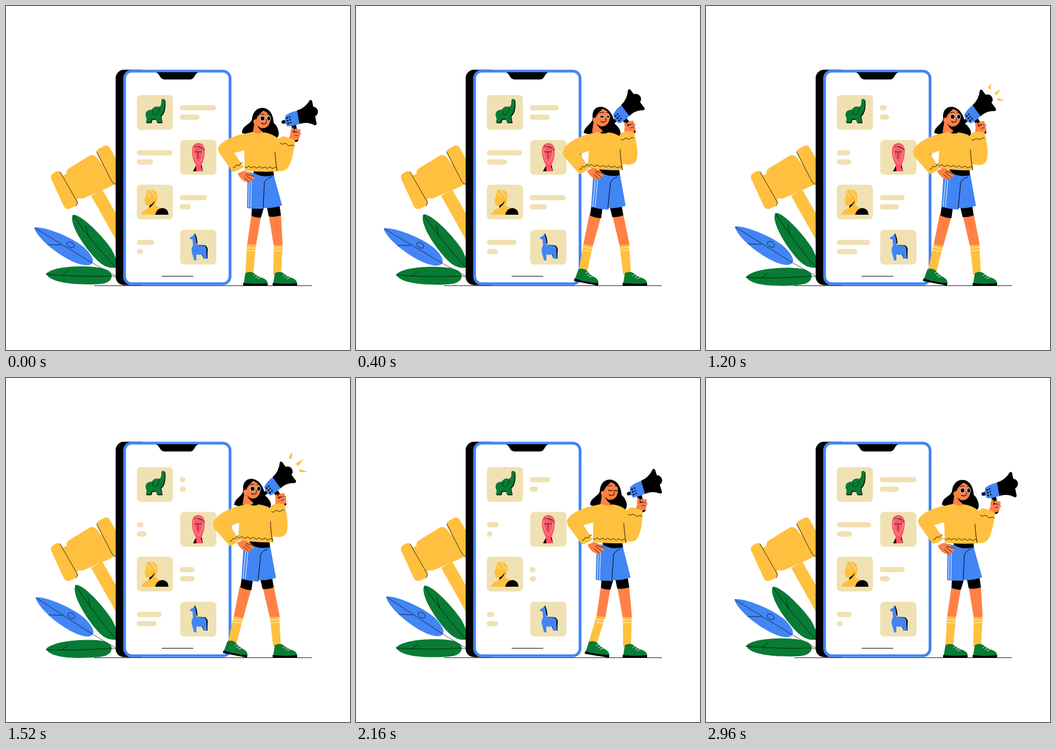
Animation of 618 by 618 pixels, one loop 3040 ms. Source, as an HTML page:

```html
<!DOCTYPE html>
<html lang="en">
<head>
<meta charset="utf-8">
<title>Online auction</title>
<style>
html, body { margin: 0; width: 100%; height: 100%; overflow: hidden; background: #fff; }
svg { display: block; width: 618px; height: 618px; }
</style>
</head>
<body>
<svg id="stage" viewBox="0 0 618 618"></svg>
<script>
const LOOP = 3040, STEP = 80;
const YELLOW = '#ffc03f', BLUE = '#4285f4', GREEN = '#087b34', SKIN = '#ff8145',
      SAND = '#f0e1b3', RED = '#ff5868', BLACK = '#000', WHITE = '#fff';

const fill = (d, color) => `<path d="${d}" fill="${color}"/>`;
const line = (d, w = 1, color = BLACK) =>
  `<path d="${d}" fill="none" stroke="${color}" stroke-width="${w}" stroke-linecap="round" stroke-linejoin="round"/>`;
const group = (tf, ...parts) => `<g transform="${tf}">${parts.join('')}</g>`;
const box = (x, y, w, h, r, color, more = '') =>
  `<rect x="${x}" y="${y}" width="${w}" height="${h}" rx="${r}" fill="${color}" ${more}/>`;
const dot = (x, y, rx, ry, color) => `<ellipse cx="${x}" cy="${y}" rx="${rx}" ry="${ry}" fill="${color}"/>`;

const lerp = (a, b, p) => a + (b - a) * p;
const cycle = (t, peak) => Math.cos((t - peak) / LOOP * 2 * Math.PI);

// Blends two paths of equal structure
function mix(a, b, p) {
  const to = b.match(/[\d.]+/g);
  let i = 0;
  return a.replace(/[\d.]+/g, n => lerp(+n, +to[i++], p).toFixed(2));
}

// Reads a value from a table of [time, value] steps
function track(table, t) {
  const i = table.findIndex(k => k[0] >= t);
  if (i < 0) return table[table.length - 1][1];
  if (i === 0) return table[0][1];
  const [t0, v0] = table[i - 1], [t1, v1] = table[i];
  return lerp(v0, v1, (t - t0) / (t1 - t0));
}

function wave(x1, y1, x2, y2, bumps, amp) {
  const pts = [], n = bumps * 8, len = Math.hypot(x2 - x1, y2 - y1);
  for (let i = 0; i <= n; i++) {
    const s = Math.sin(i / n * bumps * 2 * Math.PI) * amp;
    pts.push([lerp(x1, x2, i / n) - (y2 - y1) / len * s, lerp(y1, y2, i / n) + (x2 - x1) / len * s]
      .map(v => v.toFixed(1)).join(' '));
  }
  return line('M' + pts.join('L'), .9);
}

function gavel() {
  return fill('M153 341 L173 330 L212 398 V446Z', YELLOW)
    + fill('M100 306 L164 272 L190 318 L124 349Z', YELLOW)
    + fill('M114 291 Q107 295 109 302 L128 341 Q132 348 140 345 L184 326 L200 318 L161 270 Q156 266 150 269Z', YELLOW)
    + fill('M87 299 Q94 294 99 299 L129 351 Q130 357 124 360 L112 365 Q106 365 103 358 L81 310 Q79 303 87 299Z', YELLOW)
    + fill('M166 257 L177 251 Q183 249 186 254 L215 305 L198 321 Q191 320 188 314 L164 267 Q161 260 166 257Z', YELLOW)
    + line('M97 298 L128 352 Q129 356 126 359', .8) + line('M163 262 L190 315 Q193 320 198 321', .8);
}

function leaves(t) {
  const up = 1.3 * (1 - cycle(t, -80)), low = -1.35 * (1 - cycle(t, -80)), mid = -1.4 * (cycle(t, 480) - .55);
  return group(`rotate(${up} 198 485)`,
      fill('M120 375 C135 373 175 415 189 436 Q197 450 199 460 L198 470 Q180 473 164 457 C140 433 112 390 120 375Z', GREEN),
      line('M121 377 Q150 419 199 472 M148 414 L143 395', .7))
    + group(`rotate(${mid} 198 487)`,
      fill('M51 398 C70 395 125 418 143 436 Q158 452 156 460 Q152 468 138 465 C110 460 58 422 51 399Z', BLUE),
      line('M52 399 Q100 428 154 461 L199 486 M75 429 L99 429', .7),
      '<ellipse cx="116" cy="429" rx="7" ry="4.5" transform="rotate(30 116 429)" fill="none" stroke="#000" stroke-width=".7"/>')
    + group(`rotate(${low} 198 487)`,
      fill('M72 481 C85 468 130 466 160 469 Q190 472 190 485 Q189 500 160 500 C125 501 80 498 72 481Z', GREEN),
      line('M72 482 Q130 487 190 485 L199 487 M101 484 L111 476', .7));
}

function elephant() {
  const d = 'M279 169 Q281 165 285 168 Q287 190 278 197 L280 209 H271 L269 203 H262 L260 209 H251 Q254 203 251 198 Q249 187 262 186 Q267 179 274 181 Q280 181 279 169Z';
  return group('translate(1.2 1.5)', fill(d, BLACK)) + fill(d, GREEN)
    + line('M264 188 Q262 197 270 195 Q275 191 275 184', .6);
}

function mask() {
  return fill('M342 285 L336 297 H354 L351 284Z', BLACK)
    + fill('M334 262 Q334 246 346 246 Q358 247 357 263 Q357 275 350 288 L354 297 H342 L341 286 Q334 274 334 262Z', RED)
    + line('M339 253 Q349 250 356 259', 1.2)
    + line('M337 262 Q337 252 346 251 Q355 252 354 262 Q353 275 346 283 Q338 276 337 262Z', .6, '#ffe4e0')
    + line('M338 262 H352 M345 263 V274', .8);
}

function bust() {
  let curls = '';
  for (let i = 0; i < 15; i++)
    curls += dot(252 + (i * 5) % 19, 332 + (i * 7) % 13, 1.1, .9, SAND);
  return fill('M252 341 Q249 329 261 330 Q272 331 272 343 Q272 352 268 356 Q270 362 284 364 L275 375 H243 Q244 367 257 363 Q259 361 258 358 Q251 360 250 356 L249 347Z', YELLOW)
    + fill('M268 375 Q271 363 282 363 Q291 364 292 375Z', BLACK)
    + fill('M258 358 Q264 356 267 349 Q267 356 257 363Z', BLACK)
    + curls;
}

function llama() {
  return fill('M339 408 Q344 415 344 429 L358 430 Q364 434 362 442 L362 454 H355 L345 430 L338 420Z', BLACK)
    + fill('M336 413 L338 409 L340 413 Q342 420 342 429 L357 431 Q361 434 360 441 L361 454 H355 L353 446 Q347 448 342 446 L342 457 H338 L334 443 Q332 436 336 430 L335 419 L331 419 Q329 415 336 413Z', BLUE);
}

function phone() {
  return box(197, 114.5, 60, 387, 15, BLACK)
    + box(213, 117, 189.5, 382, 13, WHITE, `stroke="${BLUE}" stroke-width="5"`)
    + fill('M269 119 C277 121 275 132 286 132 H330 C340 132 338 121 346 119Z', BLACK)
    + line('M280 485.5 H336', 1)
    + box(235, 160, 65, 62.5, 7, SAND) + box(313, 240.5, 65, 62.5, 7, SAND)
    + box(235, 321, 65, 62.5, 7, SAND) + box(313, 402, 65, 62.5, 7, SAND)
    + elephant() + mask() + bust() + llama();
}

// left, top, peak time; long and short bars alternate
const BARS = [[312, 178, -100], [312, 195, 200], [235, 259, 190], [235, 275.5, 540],
              [312, 339.5, 560], [312, 356, 880], [235, 420, 880], [235, 436.5, 1290]];
const bars = t => BARS.map(([x, y, peak], i) => {
  const [base, amp] = i % 2 ? [23.5, 13.5] : [38, 28];
  return box(x, y, (base + amp * cycle(t, peak)).toFixed(2), 9.5, 4.75, SAND);
}).join('');

const UPPER = [[80, 0], [160, .15], [240, .62], [320, 1.14], [400, 1.06], [480, 1], [1840, 1], [1920, .95],
               [2000, .82], [2080, .56], [2160, .24], [2240, -.14], [2320, -.16], [2400, -.09], [2560, -.02], [2640, 0]];
const LOWER = [[80, 0], [160, .1], [240, .42], [320, .8], [400, .95], [480, 1], [1920, 1],
               [2000, .9], [2080, .69], [2160, .42], [2240, .12], [2320, 0]];
const EYES = [[160, 1], [240, 0], [320, 0], [400, .45], [480, 1], [1920, 1], [2000, .4], [2080, 0], [2160, 0], [2240, .4], [2320, 1]];

function shoe() {
  return fill('M427 499 L430 480 Q437 476 444 479 Q452 486 462 489 Q470 492 470 499Z', GREEN)
    + fill('M426 497.5 Q440 500 470 498 V502.5 H426Z', BLACK)
    + line('M444 485 L449 481 M448 488 L453 485 M452 490 L457 488', 1, '#dff0e2');
}

// The sock runs from knee pose k to foot pose l, so the leg bends on the way
function sock(k, l) {
  const x = (a, b, p) => lerp(a, b, p).toFixed(2);
  const tl = x(433, 409, k), tr = x(449, 426, k), ty = x(429, 431, k);
  return fill(`M${tl} 428 L${tr} ${ty} L${x(444, 413, l)} ${x(483, 481, l)} L${x(430, 398, l)} ${x(483, 478, l)}Z`, YELLOW);
}

function legs(u, k, l) {
  const m = (a, b, p = u) => mix(a, b, p);
  return fill(m('M441 375 L458 378 L449 431 L433 430Z', 'M420 374 L441 378 L426 432 L409 429Z', k), SKIN)
    + fill(m('M472 375 L494 375 L497 430 L481 431Z', 'M461 375 L481 374 L492 430 L474 431Z'), SKIN)
    + sock(k, l)
    + fill(m('M481 429 Q489 431 497 429 L494 483 L480 483Z', 'M474 429 Q484 431 491 428 L494 483 L480 483Z'), YELLOW)
    + line(m('M434 434 L448 435 M433 439 L447 440', 'M409 433 L424 436 M408 438 L423 441', k), 1.2, '#fff3d2')
    + line(m('M482 435 L496 434 M482 440 L496 439', 'M476 435 L492 433 M477 440 L493 438'), 1.2, '#fff3d2')
    + fill(m('M442 358 L464 360 L458 380 Q449 381 441 377Z', 'M424 356 L444 358 L441 381 Q430 381 421 376Z', k), BLACK)
    + fill(m('M468 358 L491 356 L494 376 Q483 380 472 378Z', 'M456 358 L478 358 L481 376 Q470 380 461 379Z'), BLACK)
    + group(`translate(${-37 * l} 0) rotate(${11 * Math.min(1, 2 * l)} 470 502)`, shoe())
    + group('translate(53 0)', shoe())
    + fill(m('M444 292 L480 294 L482 309 L446 308Z', 'M437 291 L473 292 L475 309 L440 307Z'), BLACK)
    + fill(m('M434 298 L448 301 Q460 309 481 304 L496 358 Q480 364 464 363 L462 364 Q448 365 433 363Z',
             'M427 298 L442 300 Q454 308 475 304 L485 359 Q470 364 455 363 L453 366 Q438 365 423 361Z'), BLUE)
    + line(m('M437 304 L436 361 M441 305 L440 362', 'M431 305 L426 360 M435 306 L430 361'), 1.2, '#dce8ff')
    + line(m('M478 306 Q463 312 464 321 L462 362', 'M470 307 Q455 313 457 323 L453 363'));
}

function head(u, eyes, mouth) {
  const eye = (x, y, r) => eyes < .1
    ? line(`M${x - 3.5} ${y} Q${x} ${y + 3} ${x + 3.5} ${y}`, 1.1)
    : dot(x, y, r + 1, 4.6 * eyes, WHITE) + dot(x, y, r, 3.7 * eyes, BLACK);
  const lips = mouth > .15
    ? dot(464, 211.5, 2.4, .8 + 1.7 * mouth, BLACK)
    : line('M459 210 Q463 214 468 210', 1.1);
  return fill(mix('M461 183 C448 183 443 194 442 203 C440 213 424 214 424 228 L450 238 H486 Q492 233 489 223 Q487 215 481 210 C480 195 474 184 461 183Z',
                  'M441 181 C430 181 425 190 426 200 C427 212 411 215 410 228 L437 236 H472 Q478 231 475 223 Q471 215 466 212 C463 195 455 182 441 181Z', u), BLACK)
    + group(`translate(${-18 * u} ${-3 * u})`,
      fill('M447 205 L443 230 Q453 234 462 229 L458 212Z', SKIN),
      fill('M451 213 Q456 221 464 220 L461 226 Q454 221 451 213Z', BLACK),
      dot(448, 208, 3.6, 4.6, SKIN),
      fill('M462 188 C455 195 450 199 449 207 C451 216 458 221 465 219 C472 217 476 208 475 200 C473 194 468 190 462 188Z', SKIN),
      eye(461, 202, 3.6), eye(472, 202, 2.8),
      line('M457 195 Q460 193 464 194.5 M469 194.5 Q472 193.5 474 196', 1),
      line('M467 203 L469 207.5 L466.5 208', .8), lips);
}

function megaphone(u) {
  return group(`translate(${-25 * u} ${-13 * u}) rotate(${-25 * u} 521 232)`,
    line('M517 214 L521 240', 8.5),
    line('M498 208.5 L504 207', 6),
    dot(552, 190, 8.5, 9, BLACK),
    fill('M522 188 Q537 184 546 169 Q549 168 550 171 L558 211 Q558 215 554 214 Q541 207 527 212Z', BLACK),
    fill('M502 197 Q511 190 523 188 L527 212 Q515 216 505 216 Q499 207 502 197Z', BLUE),
    [0, 1, 2].map(i => dot(505 + i, 201 + i * 5, 1.7, 1.4, BLACK) + dot(509.5 + i, 199.5 + i * 5, 1.4, 1.2, BLACK)).join(''),
    fill('M511 226 Q512 219 516 218 Q518 222 516 228 L524 230 L526 239 Q520 243 513 241Z', SKIN),
    line('M520 223 L527 224 M519 229 L527.5 230 M519 235 L525 236', 5, SKIN),
    line('M520 226.4 L528 227.3 M519 232.3 L527 233.2', .7));
}

function girl(t) {
  // The knee runs slightly ahead of the body
  const u = track(UPPER, t), k = track(UPPER, t + 40), l = track(LOWER, t), eyes = track(EYES, t);
  const talking = t >= 560 && t < 1840;
  const mouth = talking ? .5 - .5 * Math.cos((t - 1200) / 320 * 2 * Math.PI) : 0;
  const m = (a, b) => mix(a, b, u), at = (a, b) => lerp(a, b, u);
  return legs(u, k, l) + head(u, eyes, mouth)
    + line(m('M511 246 L517 232', 'M489 238 L490 221'), 12, SKIN)
    + megaphone(u)
    + fill(m('M431 229 Q440 227 444 226 Q453 232 463 227 Q479 229 490 239 L489 297 Q460 299 429 296 L428 260Z',
             'M422 229 Q431 227 435 226 Q444 232 454 227 Q470 229 478 237 L480 295 Q449 296 417 291 L419 260Z'), YELLOW)
    + fill(m('M486 241 L497 234 Q510 236 519 242 Q517 270 508 288 Q502 299 487 296Z',
             'M474 237 L477 229 Q490 222 501 228 Q508 262 505 274 Q503 290 477 284Z'), YELLOW)
    + fill(m('M432 229 C405 233 388 244 382 253 Q379 259 384 265 L407 298 Q418 296 427 289 L410 264 L432 258Z',
             'M424 229 C400 233 380 246 374 256 Q370 263 374 270 L402 302 Q412 299 419 291 L403 266 L424 258Z'), YELLOW)
    + line(m('M483 262 Q485 285 487 296', 'M475 258 Q476 280 479 294'), .9)
    + wave(at(429, 416), at(289, 286), at(486, 478), at(291, 290), 6, 1.3)
    + wave(at(408, 402), at(290, 293), at(425, 418), at(282, 284), 2, 1.3)
    + wave(at(493, 477), at(246, 240), at(518, 500), at(252, 238), 2, 1.3)
    + group(`translate(${-u} ${-5 * u})`,
      fill('M416 301 L427 296 Q439 298 446 308 Q447 312 442 313 Q440 318 434 317 Q423 315 416 301Z', SKIN),
      line('M431 304 L442 313 M428 308 L437 316 M432 302 L445 306', .8));
}

function rays(t) {
  if (t < 480 || t >= 1840) return '';
  const s = t < 560 ? .8 : t < 640 ? 1.4 : 1 + .08 * (1 - Math.cos((t - 1200) / 560 * 2 * Math.PI));
  return group(`translate(500 175) scale(${s}) translate(-500 -175)`,
    fill('M512.5 138 L506.5 147.5 L511.5 150Z', YELLOW),
    fill('M530 149 L518 156.5 L521.5 160.5Z', YELLOW),
    fill('M536.5 169.5 L523.5 165 L524 170Z', YELLOW));
}

const stage = document.getElementById('stage');
const ground = line('M159 502.5 H549', .9);
stage.innerHTML = gavel() + ground + '<g id="plant"></g>' + phone() + '<g id="bars"></g><g id="girl"></g>';
const [plantEl, barsEl, girlEl] = ['plant', 'bars', 'girl'].map(id => document.getElementById(id));

let shown = -1;
function draw(t) {
  if (t === shown) return;
  shown = t;
  plantEl.innerHTML = leaves(t);
  barsEl.innerHTML = bars(t);
  girlEl.innerHTML = rays(t) + girl(t);
}

const start = performance.now();
function tick() {
  const t = (performance.now() - start) % LOOP;
  draw(Math.floor(t / STEP) * STEP);
  requestAnimationFrame(tick);
}
draw(0);
requestAnimationFrame(tick);
</script>
</body>
</html>
```
